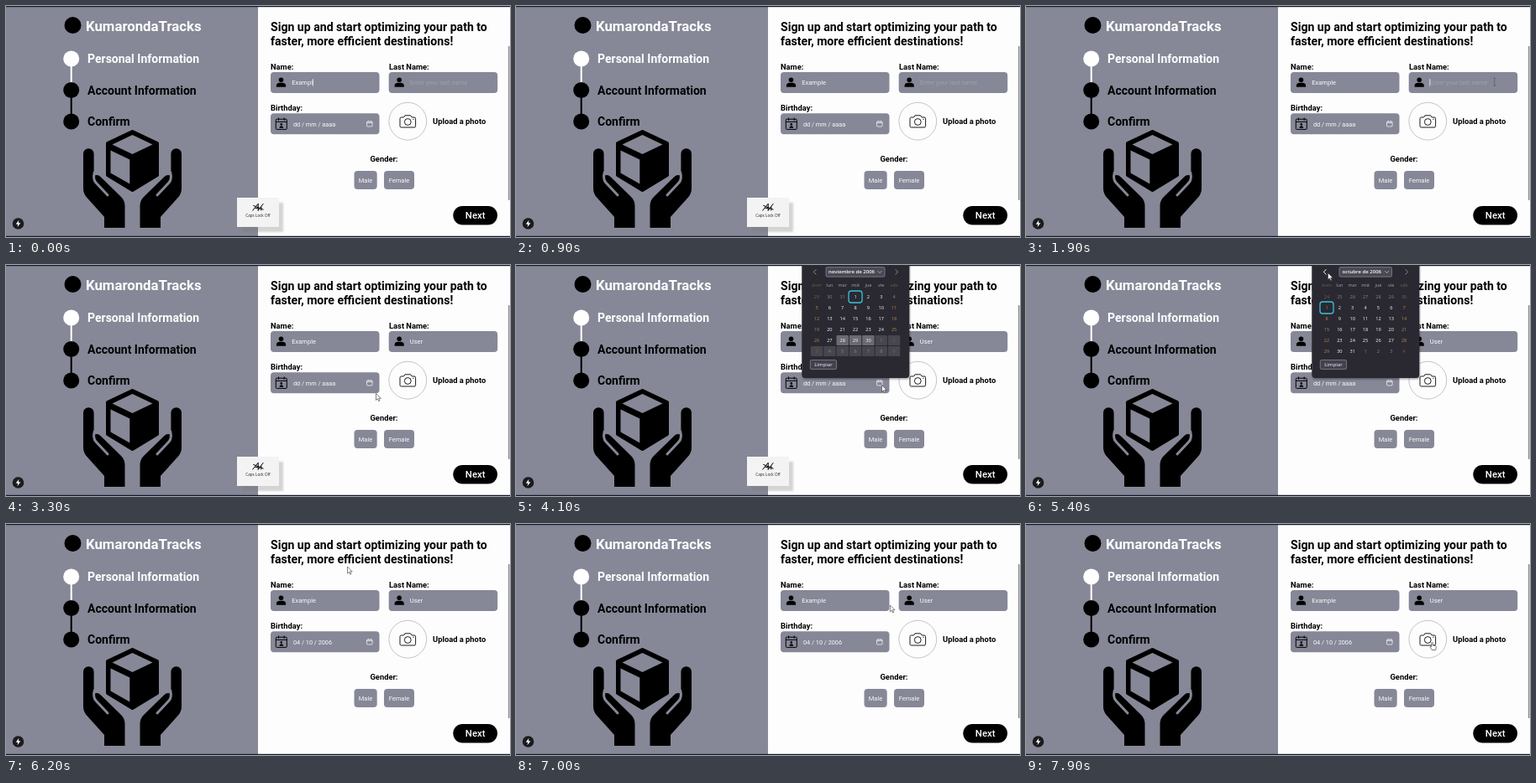
These frames come from a looping animation (600x276 px, 8 s). An HTML page:

```html
<!DOCTYPE html>
<html lang="en">
<head>
<meta charset="utf-8">
<title>Sign up</title>
<style>
  html, body { margin: 0; width: 100%; height: 100%; overflow: hidden; background: #fdfdfe; }
  svg { display: block; width: 600px; height: 276px; font-family: Roboto, sans-serif; }
  .b { font-weight: 700; }
  .label { font-weight: 700; font-size: 9.35px; }
  .step { font-weight: 700; font-size: 14px; }
  .in { font-size: 7.5px; fill: #fafafc; }
  .field { fill: #868897; }
  .mid { text-anchor: middle; }
  .line { fill: none; stroke: #000; }
  #cal { font-family: "Open Sans", "Noto Sans", sans-serif; }
</style>
</head>
<body>
<svg viewBox="0 0 600 276" xmlns="http://www.w3.org/2000/svg">
  <defs>
    <filter id="soft" x="-20%" y="-20%" width="140%" height="140%"><feGaussianBlur stdDeviation="1.2"/></filter>
    <g id="person">
      <circle cy="-3" r="2.8"/>
      <path d="M-5.6 5.4V3.6Q-5.4.6-1.6.4H1.6Q5.4.6 5.6 3.6V5.4Z"/>
    </g>
    <g id="hand">
      <path d="M92 176.5a6.3 6.3 0 0 1 12.6 0V203Q109 200.500 113 204.500L136 227Q141.5 232 141.5 239V265H117V252L95.5 228Q92 223.5 92 218Z"/>
      <path d="M105.2 199Q103.4 207 107 211L121 226" fill="none" stroke="#868897" stroke-width="3" stroke-linecap="round"/>
    </g>
  </defs>

  <rect width="600" height="276" fill="#fdfdfe"/>
  <rect width="300" height="276" fill="#868897"/>

  <!-- left panel -->
  <circle cx="79.5" cy="23" r="10"/>
  <text class="b" x="95" y="29.5" font-size="16.8" fill="#fff">KumarondaTracks</text>
  <path d="M77.7 100V138" stroke="#000" stroke-width="2"/>
  <path d="M77.7 63V100" stroke="#fff" stroke-width="2"/>
  <circle cx="77.7" cy="63" r="9.5" fill="#fff"/>
  <circle cx="77.7" cy="100.5" r="9.5"/>
  <circle cx="77.7" cy="138" r="9.5"/>
  <text class="step" x="97" y="68" fill="#fff">Personal Information</text>
  <text class="step" x="97" y="105.5">Account Information</text>
  <text class="step" x="97" y="143">Confirm</text>

  <path d="M150.5 150L180 164V202L150.5 220L121 202V164Z" stroke="#000" stroke-width="4" stroke-linejoin="round"/>
  <path d="M150.5 154L174.5 165.5L150.5 177L126.5 165.5Z" fill="#868897"/>
  <path d="M147.3 183.5L124.5 172.5V199.5L147.3 212.5Z" fill="#868897"/>
  <use href="#hand"/>
  <use href="#hand" transform="translate(301 0) scale(-1 1)"/>

  <circle cx="14.5" cy="260" r="6.8" fill="#1b1b1e"/>
  <path d="M15.4 255.8L11.7 260.7H14.2L13.5 264.2L17.3 259.2H14.8Z" fill="#fff"/>

  <!-- form -->
  <g class="b" font-size="14.1">
    <text x="315" y="29.7">Sign up and start optimizing your path to</text>
    <text x="315" y="47">faster, more efficient destinations!</text>
  </g>
  <text class="label" x="315" y="75.8">Name:</text>
  <text class="label" x="456" y="75.8">Last Name:</text>
  <text class="label" x="315" y="125.2">Birthday:</text>
  <text class="label" x="508" y="141.3">Upload a photo</text>
  <text class="label mid" x="450" y="185.8">Gender:</text>

  <g class="field">
    <rect x="315" y="79" width="129.5" height="25" rx="4"/>
    <rect x="455.7" y="79" width="129.5" height="25" rx="4"/>
    <rect x="315" y="128.3" width="129.5" height="25" rx="4"/>
    <rect x="414.5" y="197" width="27.2" height="22" rx="4"/>
    <rect x="450" y="197" width="36" height="22" rx="4"/>
  </g>
  <use href="#person" x="327.5" y="91.3"/>
  <use href="#person" x="468.2" y="91.3"/>
  <text class="in" id="first" x="340.3" y="94"></text>
  <text class="in" id="last" x="480.8" y="94"></text>
  <text class="in" id="date" x="342" y="143.5" style="font-size:7.3px"></text>
  <rect id="caret" y="87" width=".7" height="8.5" fill="#fff"/>

  <g class="line">
    <rect x="321.3" y="135.2" width="13" height="12.2" rx="1"/>
    <path d="M321.3 138.4H334.3M324.5 133.5V136.8M331.2 133.5V136.8"/>
  </g>
  <circle cx="327.8" cy="141.4" r="1.3"/>
  <path d="M325.3 145.8Q325.5 143.3 327.8 143.3T330.3 145.8Z"/>
  <g class="line" style="stroke:#f0f0f4" stroke-width=".8">
    <rect x="429.5" y="138" width="6.6" height="6" rx="1"/>
    <path d="M429.5 139.6H436.1M431.3 137V138.5M434.3 137V138.5"/>
  </g>

  <circle cx="478.3" cy="137.7" r="22.4" fill="#fdfdfe" stroke="#bdbdc4" stroke-width=".9"/>
  <g class="line" stroke-width=".9" stroke-linejoin="round">
    <path d="M470.5 133H473.5L475 130.8H481.6L483.2 133H486Q487.6 133 487.6 134.6V143.5Q487.6 145 486 145H470.5Q469 145 469 143.5V134.6Q469 133 470.5 133Z"/>
    <circle cx="478.3" cy="138.5" r="3.9"/>
    <path d="M484.3 135.3H485.6"/>
  </g>

  <text class="in mid" x="428" y="210.7">Male</text>
  <text class="in mid" x="468" y="210.7">Female</text>
  <rect x="532.3" y="239" width="52.7" height="22.5" rx="11.2"/>
  <text class="mid" x="558.7" y="254.4" font-size="11.4" font-weight="500" fill="#fff">Next</text>

  <rect x="597.9" y="48" width="1.6" height="184" fill="#8d8d92"/>
  <rect width="600" height="1.2" fill="#111a2c"/>
  <rect y="274.8" width="600" height="1.2" fill="#111a2c"/>

  <g id="toast">
    <rect x="281" y="235" width="49" height="35" fill="#777" opacity=".3" filter="url(#soft)"/>
    <rect x="275" y="229" width="50" height="35" fill="#f3f3f3"/>
    <path class="line" d="M293.5 244.5L300.2 236.2V244.5M296.5 241.6H300.2M300.2 244.5L306.3 236.2M303.8 240V244.5M294.3 238.3L306.5 243.3"/>
    <text class="mid" x="300" y="252" font-size="4.6" fill="#222" style="font-family:'Open Sans',sans-serif">Caps Lock Off</text>
  </g>

  <g id="cal">
    <path d="M341 0H469V133Q469 136.5 465 136.5H345Q341 136.5 341 133Z" opacity=".35" filter="url(#soft)"/>
    <path d="M340.3 0H468.3V131Q468.3 135 464.3 135H344.3Q340.3 135 340.3 131Z" fill="#2a2932"/>
    <path id="prev" d="M357.4 5.2L354.4 8.3L357.4 11.4" fill="none"/>
    <path d="M451.6 5.2L454.6 8.3L451.6 11.4" fill="none" stroke="#96959f" stroke-width=".9"/>
    <rect id="monthBox" y="2.6" height="11.5" rx="1.5" fill="#4a4954" stroke="#8f8f9d" stroke-width=".7"/>
    <text id="month" class="mid" y="10.4" font-size="6" font-weight="600" fill="#fbfbfe"></text>
    <path id="drop" d="M-2.3 7.2L0 9.5L2.3 7.2" fill="none" stroke="#d5d5dc" stroke-width=".7"/>
    <g id="days" class="mid" font-size="5.6"></g>
    <rect x="350.3" y="113.5" width="31.2" height="11" rx="1.5" fill="#42414d" stroke="#8f8f9d" stroke-width=".7"/>
    <text class="mid" x="365.9" y="121.2" font-size="6.1" fill="#fbfbfe">Limpiar</text>
  </g>

  <g id="pointer">
    <path id="arrow" d="M0 0V8L1.9 6.3L3.2 9.2L4.5 8.6L3.2 5.8H5.7Z" fill="#fff" stroke="#333" stroke-width=".6" stroke-linejoin="round"/>
    <path id="ibeam" d="M-1.5-4.5H1.5M0-4.5V4.5M-1.5 4.5H1.5" fill="none" stroke="#55565f" stroke-width=".7"/>
    <path id="finger" d="M-.8.4Q0-.6.8.4V3.4L4 4.2Q5 4.6 4.8 5.8L4.2 9H-.2L-2.6 5.8Q-2.6 4.6-.8 5.4Z" fill="#fff" stroke="#222" stroke-width=".6" stroke-linejoin="round"/>
  </g>
</svg>

<script>
const LOOP = 8000;
const OPEN = 3800, FLIP = 5200, PICK = 6000;
const $ = id => document.getElementById(id);
const show = (id, on) => { $(id).style.display = on ? "" : "none"; };
const within = (v, a, b) => v >= a && v < b;

// pointer path: time, x, y
const path = [
  [1000, 418, 92], [1650, 559, 90.5], [2900, 547, 92], [3250, 440.5, 153.5],
  [3400, 440.5, 153.5], [3700, 435.5, 143.5], [4400, 435.5, 143.5],
  [5050, 359.5, 9.5], [5450, 359.5, 9.5], [5850, 404.5, 49],
  [6050, 404.5, 49], [6200, 406.5, 51], [6500, 407, 52], [7500, 483.5, 141.5]
];

function pointerAt(t) {
  let i = 0;
  while (i < path.length - 2 && t >= path[i + 1][0]) i++;
  const [t0, x0, y0] = path[i], [t1, x1, y1] = path[i + 1];
  const k = Math.min(1, Math.max(0, (t - t0) / (t1 - t0)));
  const e = k * k * (3 - 2 * k);
  return [x0 + (x1 - x0) * e, y0 + (y1 - y0) * e];
}

function add(parent, tag, attrs, text) {
  const el = document.createElementNS("http://www.w3.org/2000/svg", tag);
  for (const key in attrs) el.setAttribute(key, attrs[key]);
  if (text !== undefined) el.textContent = text;
  parent.appendChild(el);
}

function buildMonth(month) {
  const days = $("days");
  days.textContent = "";
  const colX = c => 358 + c * 15.35;
  const limit = new Date(2006, 10, 27);
  const lead = new Date(2006, month, 1).getDay() || 7;
  ["dom", "lun", "mar", "mié", "jue", "vie", "sáb"].forEach((d, c) =>
    add(days, "text", { x: colX(c), y: 26.3, fill: c % 6 ? "#a3a2ab" : "#6f5c48" }, d));
  for (let i = 0; i < 42; i++) {
    const c = i % 7, x = colX(c), y = 38 + 13 * Math.floor(i / 7);
    const day = new Date(2006, month, 1 - lead + i);
    const current = day.getMonth() === month, weekend = c % 6 === 0;
    if (day > limit)
      add(days, "rect", { x: x - 7.2, y: y - 5.9, width: 14.4, height: 11.8, rx: 1, fill: current ? "#6b6a73" : "#47464f" });
    const fill = weekend ? (current ? "#b5854f" : "#775f45") : (current ? "#fbfbfe" : "#85848d");
    add(days, "text", { x, y: y + 2, fill }, day.getDate());
    if (current && day.getDate() === 1)
      add(days, "rect", { x: x - 8, y: y - 7, width: 16, height: 14, rx: 3, fill: "none", stroke: "#35c3da", "stroke-width": 1.3 });
  }
  const [name, left, width] = month === 10 ? ["noviembre", 369, 70] : ["octubre", 373, 62.5];
  $("month").textContent = name + " de 2006";
  $("month").setAttribute("x", left + width / 2 - 4.5);
  $("monthBox").setAttribute("x", left);
  $("monthBox").setAttribute("width", width);
  $("drop").setAttribute("transform", `translate(${left + width - 6} 0)`);
}

let shownMonth = -1;

function draw(t) {
  const typed = t < 2300 ? 0 : Math.min(4, 1 + Math.floor((t - 2300) / 150));
  const inLast = t >= 1800;
  $("first").textContent = t < 300 ? "Exampl" : "Example";
  $("last").textContent = typed ? "User".slice(0, typed) : "Enter your last name";
  $("last").style.fill = typed ? "" : "#9fa0ac";
  $("date").textContent = t < PICK ? "dd / mm / aaaa" : "04 / 10 / 2006";

  const input = $(inLast ? "last" : "first");
  const used = inLast && !typed ? 0 : input.getComputedTextLength();
  $("caret").setAttribute("x", (inLast ? 480.5 : 340.5) + used);
  const blink = inLast ? (t - 1800) % 1000 < 500 || within(t, 2300, 2900) : t < 800 || t >= 1300;
  show("caret", blink && t < 3100);

  show("toast", t < 1000 || within(t, 2200, 4300));
  show("cal", within(t, OPEN, PICK));
  const month = t < FLIP ? 10 : 9;
  if (month !== shownMonth) buildMonth(shownMonth = month);

  const [x, y] = pointerAt(t);
  const overPrev = x < 363 && y < 15;
  $("prev").setAttribute("stroke", overPrev ? "#fff" : "#96959f");
  $("prev").setAttribute("stroke-width", overPrev ? 1 : .9);

  const overText = within(y, 79, 104) && (within(x, 315, 444) || within(x, 456, 585));
  const overPhoto = Math.hypot(x - 478.3, y - 137.7) < 22.4;
  show("pointer", within(t, 1000, 2200) || t >= 2900);
  show("ibeam", overText);
  show("finger", !overText && overPhoto);
  show("arrow", !overText && !overPhoto);
  $("pointer").setAttribute("transform", `translate(${x} ${y})`);
}

const start = performance.now();
function tick() {
  draw((performance.now() - start) % LOOP);
  requestAnimationFrame(tick);
}
tick();
</script>
</body>
</html>
```
